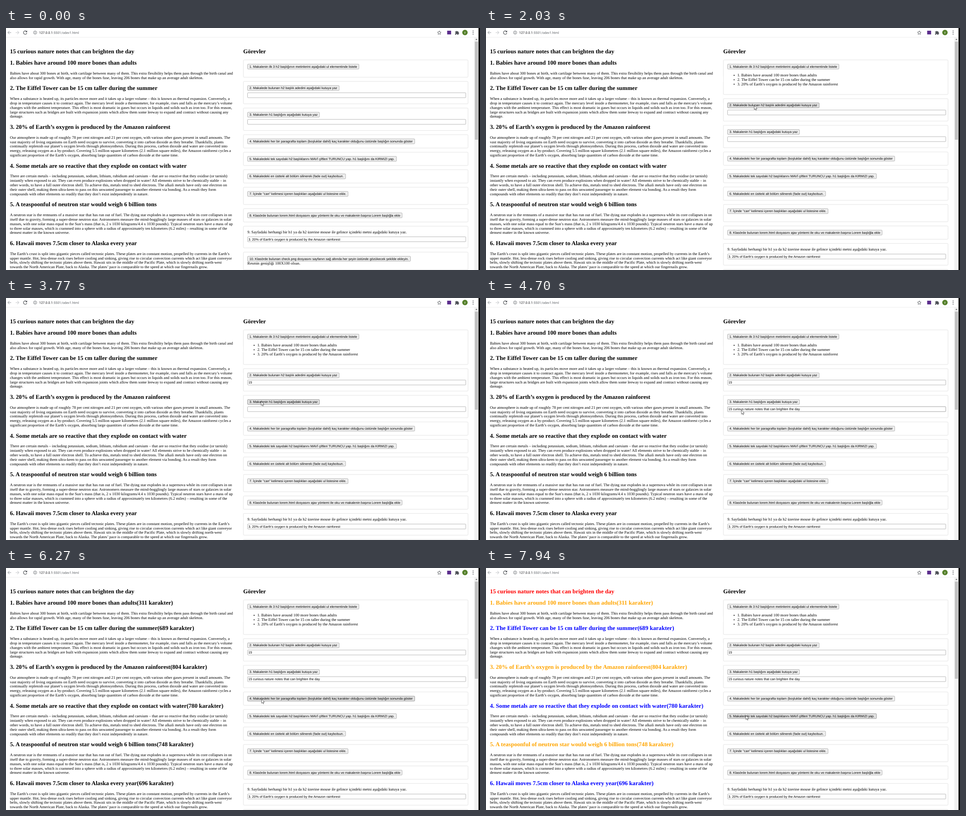
An HTML page that plays this animation: 1047 px wide and 535 px high, repeating every 8000 ms.

```html
<!DOCTYPE html>
<html lang="tr">
<head>
<meta charset="utf-8">
<style>
html, body { margin: 0; width: 100%; height: 100%; overflow: hidden; background: #fff; }
#page {
  position: absolute; left: 0; top: 0; width: 1920px; height: 981.2px; overflow: hidden;
  transform: scale(.5453125); transform-origin: 0 0; color: #000;
  font: 16px/18px 'Liberation Serif', 'Times New Roman', serif;
  text-rendering: geometricPrecision; white-space: pre;
}
#bar, #over { position: absolute; left: 0; top: 0; }
#bar text { font-family: Roboto, sans-serif; }
.col { position: absolute; top: 82px; }
h1, h2 { margin: 0 0 20px; font: bold 24px/27px 'Liberation Serif', 'Times New Roman', serif; }
p { margin: 0 0 20px; }
.card { box-sizing: border-box; width: 911px; margin-bottom: 16px; padding: 16px; border: 1px solid #ccc; border-radius: 4px; }
.btn, .inp {
  box-sizing: border-box; height: 21px; border: 1px solid #767676; border-radius: 3px;
  font: 13.333px/19px 'Liberation Sans', Arial, sans-serif;
}
.btn { width: fit-content; padding: 0 7px; background: #efefef; }
.inp { width: 885px; margin: 8px 0; padding: 0 3px; }
.hot { border-color: #4f4f4f; }
.btn.hot { background: #e2e2e2; }
.btn.down { background: #f5f5f5; border-color: #8d8d8d; }
ul { margin: 16px 0 0; padding: 0 0 0 40px; }
#list li { display: none; }
.listed #list { margin-bottom: 16px; }
.listed #list li { display: list-item; }
h2 span { display: none; }
.counted h2 span { display: inline; }
.coloured h1.top { color: #f00; }
.coloured h2 { color: #ffa500; }
.coloured h2.even { color: #00f; }
#over { pointer-events: none; }
</style>
</head>
<body>
<div id="page">
<svg id="bar" width="1920" height="982" fill="none" stroke-width="2">
  <path d="M0 37.5H1914" stroke="#dcdcdc" stroke-width="1"/>
  <path d="M21 18.5H8M14 12l-6.500 6.500 6.500 6.500" stroke="#a9acb0"/>
  <path d="M39 18.500H52M46 12l6.500 6.500-6.500 6.500" stroke="#cfd1d4"/>
  <path d="M83 14A7 7 0 1 0 84.500 20.500" stroke="#45494d"/>
  <path d="M85.500 10v7h-7z" fill="#45494d"/>
  <circle cx="118" cy="18.500" r="6.500" stroke="#5f6368" stroke-width="1.600"/>
  <path d="M118 17.500v4.500M118 14v2" stroke="#5f6368"/>
  <text x="134" y="23.500" font-size="13.400" fill="#202124">127.0.0.1<tspan fill="#5f6368">:5501/odev1.html</tspan></text>
  <path d="M1755 11.500l2.200 4.900 5.300.600-4 3.600 1.100 5.300-4.600-2.700-4.600 2.700 1.100-5.300-4-3.600 5.300-.600z" stroke="#4d5156" stroke-width="1.600"/>
  <rect x="1787" y="11" width="16" height="15" fill="#5b2d8c"/>
  <path d="M1819 14h4.500a2.800 2.800 0 0 1 5.500 0h4v4.500a2.800 2.800 0 0 1 0 5.500v3h-5a2.500 2.500 0 0 0-5 0h-4v-4.500a2.500 2.500 0 0 0 0-5z" fill="#4d5156"/>
  <circle cx="1859" cy="18.500" r="11" fill="#55802a"/>
  <text x="1859" y="23" font-size="12" fill="#fff" text-anchor="middle">Y</text>
  <path d="M1892 12v.010M1892 18.500v.010M1892 25v.010" stroke="#4d5156" stroke-width="3.600" stroke-linecap="round"/>
  <rect x="1897" y="38" width="17" height="944" fill="#f1f1f1"/>
  <path d="M1901.500 48l4-4.500 4 4.500z" fill="#606060"/>
  <rect id="thumb" x="1899" y="55" width="13" height="398" fill="#c1c1c1"/>
  <rect x="1914" y="0" width="6" height="982" fill="#000"/>
</svg>
<div class="col" id="article" style="left:16px"></div>
<div class="col" id="tasks" style="left:961px"></div>
<svg id="over" width="1920" height="982">
  <defs><radialGradient id="glow">
    <stop offset=".5" stop-color="#f5e52e" stop-opacity=".85"/>
    <stop offset="1" stop-color="#f5e52e" stop-opacity="0"/>
  </radialGradient></defs>
  <g id="cursor">
    <circle id="click" cx="0" cy="6" r="18" fill="url(#glow)"/>
    <path d="M0 0V16.500L4 13L6.500 19L9 18L6.500 12H12Z" fill="#fff" stroke="#222" stroke-width="1.200"/>
  </g>
</svg>
</div>
<script>
const $ = id => document.getElementById(id);
const page = $('page'), SCALE = 1047 / 1920, LOOP = 8000;
const title = '15 curious nature notes that can brighten the day';

const facts = [
['Babies have around 100 more bones than adults', 311,
`Babies have about 300 bones at birth, with cartilage between many of them. This extra flexibility helps them pass through the birth canal and
also allows for rapid growth. With age, many of the bones fuse, leaving 206 bones that make up an average adult skeleton.`],
['The Eiffel Tower can be 15 cm taller during the summer', 689,
`When a substance is heated up, its particles move more and it takes up a larger volume – this is known as thermal expansion. Conversely, a
drop in temperature causes it to contract again. The mercury level inside a thermometer, for example, rises and falls as the mercury’s volume
changes with the ambient temperature. This effect is most dramatic in gases but occurs in liquids and solids such as iron too. For this reason,
large structures such as bridges are built with expansion joints which allow them some leeway to expand and contract without causing any
damage.`],
['20% of Earth’s oxygen is produced by the Amazon rainforest', 804,
`Our atmosphere is made up of roughly 78 per cent nitrogen and 21 per cent oxygen, with various other gases present in small amounts. The
vast majority of living organisms on Earth need oxygen to survive, converting it into carbon dioxide as they breathe. Thankfully, plants
continually replenish our planet’s oxygen levels through photosynthesis. During this process, carbon dioxide and water are converted into
energy, releasing oxygen as a by-product. Covering 5.5 million square kilometres (2.1 million square miles), the Amazon rainforest cycles a
significant proportion of the Earth’s oxygen, absorbing large quantities of carbon dioxide at the same time.`],
['Some metals are so reactive that they explode on contact with water', 780,
`There are certain metals – including potassium, sodium, lithium, rubidium and caesium – that are so reactive that they oxidise (or tarnish)
instantly when exposed to air. They can even produce explosions when dropped in water! All elements strive to be chemically stable – in
other words, to have a full outer electron shell. To achieve this, metals tend to shed electrons. The alkali metals have only one electron on
their outer shell, making them ultra-keen to pass on this unwanted passenger to another element via bonding. As a result they form
compounds with other elements so readily that they don’t exist independently in nature.`],
['A teaspoonful of neutron star would weigh 6 billion tons', 748,
`A neutron star is the remnants of a massive star that has run out of fuel. The dying star explodes in a supernova while its core collapses in on
itself due to gravity, forming a super-dense neutron star. Astronomers measure the mind-bogglingly large masses of stars or galaxies in solar
masses, with one solar mass equal to the Sun’s mass (that is, 2 x 1030 kilograms/4.4 x 1030 pounds). Typical neutron stars have a mass of up
to three solar masses, which is crammed into a sphere with a radius of approximately ten kilometres (6.2 miles) – resulting in some of the
densest matter in the known universe.`],
['Hawaii moves 7.5cm closer to Alaska every year', 696,
`The Earth’s crust is split into gigantic pieces called tectonic plates. These plates are in constant motion, propelled by currents in the Earth’s
upper mantle. Hot, less-dense rock rises before cooling and sinking, giving rise to circular convection currents which act like giant conveyor
belts, slowly shifting the tectonic plates above them. Hawaii sits in the middle of the Pacific Plate, which is slowly drifting north-west
towards the North American Plate, back to Alaska. The plates’ pace is comparable to the speed at which our fingernails grow.`]];

const heading = i => `${i + 1}. ${facts[i][0]}`;
const input = (id, text = '') => `<div class="inp" id="${id}">${text}</div>`;
const items = [0, 1, 2].map(i => `<li>${heading(i)}</li>`).join('');

// [button label, what follows it]
const tasks = [
  ['Makalenin ilk 3 h2 başlığının metinlerini aşağıdaki ul elementinde listele', `<ul id="list">${items}</ul>`],
  ['Makalede bulunan h2 başlık adedini aşağıdaki kutuya yaz', input('count')],
  ['Makalenin h1 başlığını aşağıdaki kutuya yaz', input('name')],
  ['Makaledeki her bir paragrafta toplam (boşluklar dahil) kaç karakter olduğunu üstünde başlığın sonunda göster', ''],
  ['Makaledeki tek sayıdaki h2 başlıklarını MAVİ çiftleri TURUNCU yap. h1 başlığını da KIRMIZI yap.', ''],
  ['Makaledeki en üstteki alt bölüm silinerek (fade out) kaybolsun.', ''],
  ['İçinde "can" kelimesi içeren başlıkları aşağıdaki ul listesine ekle.', '<ul></ul>'],
  ['Klasörde bulunan lorem.html dosyasını ajax yöntemi ile oku ve makalenin başına Lorem başlığla ekle', ''],
  ['', 'Sayfadaki herhangi bir h1 ya da h2 üzerine mouse ile gelince içindeki metni aşağıdaki kutuya yaz.' + input('hover', heading(2))],
  ['Klasörde bulunan check.png dosyasını sayfanın sağ altında her şeyin üstünde gözükecek şekilde ekleyin.', 'Resmin genişliği 100X100 olsun.']
];

$('article').innerHTML = `<h1 class="top">${title}</h1>` + facts.map(([, n, text], i) =>
  `<h2 class="${i % 2 ? 'even' : ''}">${heading(i)}<span>(${n} karakter)</span></h2><p>${text}</p>`).join('');
$('tasks').innerHTML = '<h1>Görevler</h1>' + tasks.map(([label, rest], i) =>
  `<div class="card">${label ? `<div class="btn">${i + 1}. ${label}</div>${rest}` : `${i + 1}. ${rest}`}</div>`).join('');

// cursor tip: time, x, y
const path = [
  [70, 1030, 526], [820, 637, 82], [1550, 637, 82], [2030, 592.5, 171.5], [2910, 592.5, 171.5],
  [3710, 563.5, 227], [3770, 563.5, 228.5], [4370, 563.5, 228.5], [5120, 565, 275.5],
  [5330, 565, 285], [5480, 564.5, 289], [5740, 564.5, 290], [6270, 564.5, 290], [6340, 564.5, 291],
  [6600, 564.5, 291], [6840, 496, 267], [7080, 567, 326], [7700, 567, 326], [7940, 574, 326]
];
const presses = [[2490, 2630], [4230, 4370], [5940, 6090], [7540, 7680]];

function tip(t) {
  const i = path.findIndex(k => k[0] > t);
  if (i < 0) return path[path.length - 1].slice(1);
  const [t0, x0, y0] = path[Math.max(0, i - 1)], [t1, x1, y1] = path[i];
  const u = t1 > t0 ? (t - t0) / (t1 - t0) : 0, e = u * u * (3 - 2 * u);
  return [x0 + (x1 - x0) * e, y0 + (y1 - y0) * e];
}

let hot = null;
function draw(now) {
  const t = now % LOOP, [x, y] = tip(t);
  page.classList.toggle('listed', t >= 1300);
  page.classList.toggle('counted', t >= 6090);
  page.classList.toggle('coloured', t >= 7680);
  $('count').textContent = t >= 2630 ? '15' : '';
  $('name').textContent = t >= 4370 ? title : '';
  $('thumb').setAttribute('height', t >= 6090 ? 394 : 398);

  $('cursor').setAttribute('transform', `translate(${x / SCALE} ${y / SCALE})`);
  $('cursor').style.display = t < 70 ? 'none' : '';
  $('click').style.display = t >= 1220 && t < 1300 ? '' : 'none';

  if (hot) hot.classList.remove('hot', 'down');
  const under = t < 70 ? null : document.elementFromPoint(x, y);
  hot = under && under.closest('.btn, .inp');
  if (hot) {
    hot.classList.add('hot');
    hot.classList.toggle('down', presses.some(([a, b]) => t >= a && t < b));
  }
}

const start = performance.now();
function tick() {
  draw(performance.now() - start);
  requestAnimationFrame(tick);
}
tick();
</script>
</body>
</html>
```
